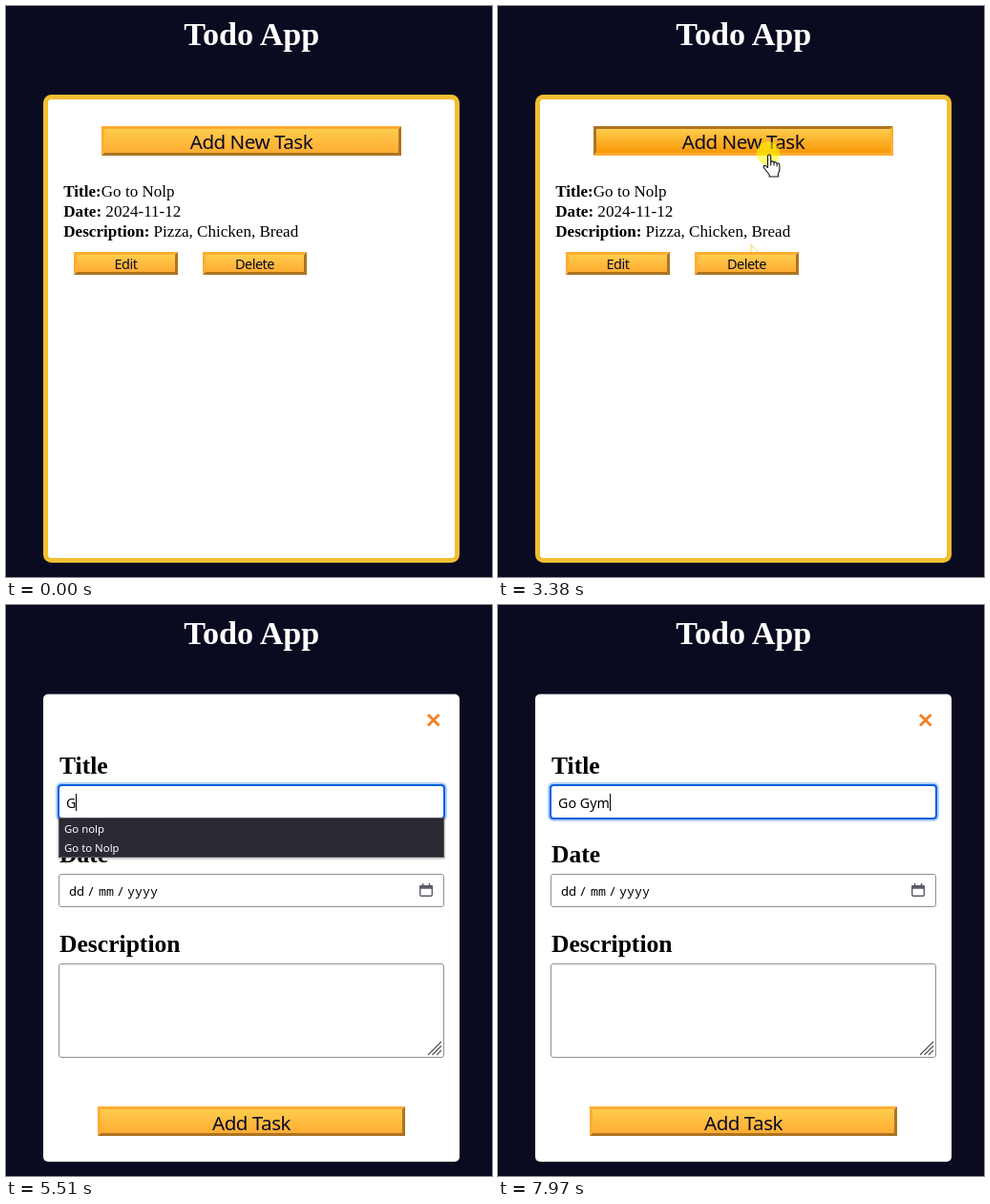
Animation, 509 px wide and 599 px high, one loop 8000 ms. Source, as an HTML page:

```html
<!DOCTYPE html>
<html lang="en">
<head>
<meta charset="utf-8">
<title>Todo App</title>
<style>
  html, body { margin: 0; width: 100%; height: 100%; overflow: hidden; background: #0a0a21; }
  svg { display: block; width: 509px; height: 599px; }
  text { white-space: pre; }
  .serif { font-family: "Liberation Serif", serif; font-size: 17.07px; }
  .h1 { font: bold 34.13px "Liberation Serif", serif; fill: #fff; text-anchor: middle; }
  .label { font: bold 25.6px "Liberation Serif", serif; }
  .big { font: 20.6px "Noto Sans", sans-serif; letter-spacing: -.5px; text-anchor: middle; fill: #0a0a23; }
  .small { font: 14.5px "Noto Sans", sans-serif; letter-spacing: -.5px; text-anchor: middle; fill: #0a0a23; }
  .input { font: 14.3px "Noto Sans", sans-serif; }
  .mono { font: 13.33px "Noto Sans Mono", monospace; }
  .menu { font: 11.4px "Noto Sans", sans-serif; fill: #fbfbfe; }
  .field { fill: #fff; stroke: #8f8f9d; }
</style>
</head>
<body>
<svg id="stage" viewBox="0 0 509 599">
  <defs>
    <linearGradient id="normal" x2="0" y2="1">
      <stop stop-color="#fecc4c"/><stop offset="1" stop-color="#ffac33"/>
    </linearGradient>
    <linearGradient id="hover" x2="0" y2="1">
      <stop stop-color="#ffcc4c"/><stop offset="1" stop-color="#f89808"/>
    </linearGradient>
  </defs>
  <rect width="509" height="599" fill="#0a0a21"/>
  <text class="h1" x="257.3" y="41">Todo App</text>

  <g id="list">
    <rect x="41.5" y="95.5" width="431" height="486" rx="6" fill="#fff" stroke="#f1be32" stroke-width="5"/>
    <g class="serif">
      <text x="60.3" y="200"><tspan font-weight="bold">Title:</tspan>Go to Nolp</text>
      <text x="60.3" y="221"><tspan font-weight="bold">Date:</tspan> 2024-11-12</text>
      <text x="60.3" y="242"><tspan font-weight="bold">Description:</tspan> Pizza, Chicken, Bread</text>
    </g>
    <g id="listButtons"></g>
  </g>

  <g id="form">
    <rect x="39" y="93.5" width="436" height="490.5" rx="5" fill="#fff"/>
    <path d="M442 115l11.5 11.5M453.500 115L442 126.500" stroke="#f28127" stroke-width="3"/>
    <text class="label" x="56" y="177">Title</text>
    <text class="label" x="56" y="270">Date</text>
    <text class="label" x="56" y="364">Description</text>
    <rect class="field" x="55.500" y="189.500" width="403" height="34" rx="2.500"/>
    <g id="ring" fill="none" stroke-width="2">
      <rect x="53" y="187" width="408" height="39" rx="5" stroke="#0060df" stroke-opacity=".3"/>
      <rect x="55" y="189" width="404" height="35" rx="3" stroke="#0060df"/>
    </g>
    <text id="typed" class="input" x="63" y="213"></text>
    <rect id="caret" y="198" width="1" height="18"/>
    <rect class="field" x="55.500" y="282.500" width="403" height="34" rx="2.500"/>
    <g class="mono">
      <text x="66" y="305">dd</text><text x="85" y="305">/</text>
      <text x="97" y="305">mm</text><text x="116" y="305">/</text>
      <text x="127" y="305">yyyy</text>
    </g>
    <g fill="none" stroke="#5b5b66">
      <rect x="433.700" y="294.700" width="12.600" height="10.600" rx="1.500" stroke-width="1.400"/>
      <path d="M433 296h14" stroke-width="3.500"/>
      <path d="M436.500 292v3M443.500 292v3" stroke-width="1.500"/>
    </g>
    <rect class="field" x="55.500" y="376.500" width="403" height="98" rx="2.500"/>
    <path d="M442 472l14-14M446.500 472l9.500-9.500M451 472l5-5" stroke="#55555c" stroke-width="1.200"/>
    <g id="formButton"></g>
  </g>

  <path id="speck" d="M265 258v-8l7 8" fill="none" stroke="#ffc057" opacity=".8"/>
  <g id="menu">
    <rect x="53.500" y="223" width="407" height="44" rx="2" fill="#000" opacity=".15"/>
    <rect x="55.500" y="223.500" width="403" height="41" fill="#2b2a33" stroke="#55545e"/>
    <text class="menu" x="61" y="239">Go nolp</text>
    <text class="menu" x="61" y="259">Go to Nolp</text>
  </g>

  <circle id="press" r="12.300" fill="#ff0" opacity=".55"/>
  <g id="cursor">
    <path id="arrow" d="M.5.5v16l3.700-3.500 2.500 5.800 2.600-1.100-2.500-5.700h5.200z" fill="#fff" stroke="#000"/>
    <g id="beam" fill="none">
      <path d="M-3.500-7.500h3l.5.500.5-.500h3M-3.500 8.500h3l.5-.500.5.500h3M0-7V8" stroke="#222" stroke-width="1.200"/>
    </g>
    <path id="hand" d="M-2.500 12V2Q-2.500.5-1 .5T.7 2V8.500Q1 7.300 2.300 7.400T4 9Q4.400 8 5.700 8.200T7.200 10Q7.800 9.200 8.900 9.600T9.900 11.500V16Q9.900 18 8.400 20.200V23.500H-.8V21.500L-6.300 14.500Q-7.500 12.500-6.300 11.900T-3.800 12.800L-2.500 14ZM.7 8.500V12M4 9V12M7.200 10V13" fill="#fff" stroke="#111" stroke-width="1.100" stroke-linejoin="round"/>
  </g>
</svg>
<script>
const LOOP = 8000, STEP = 66.6;
const $ = id => document.getElementById(id);
const show = (id, on) => $(id).style.display = on ? "" : "none";
const inside = ([x, y, w, h], px, py) => px >= x && px < x + w && py >= y && py < y + h;
const between = (t, a, b) => t >= a && t < b;

const LIGHT = "#feac32", DARK = "#ad7423", BEVEL = 3;

function makeButton(parent, box, label, size, baseline) {
  const [x, y, w, h] = box, b = BEVEL;
  const g = document.createElementNS("http://www.w3.org/2000/svg", "g");
  g.innerHTML =
    `<path d="M${x} ${y + h}V${y}H${x + w}l${-b} ${b}H${x + b}V${y + h - b}z"/>` +
    `<path d="M${x} ${y + h}H${x + w}V${y}l${-b} ${b}V${y + h - b}H${x + b}z"/>` +
    `<rect x="${x + b}" y="${y + b}" width="${w - 2 * b}" height="${h - 2 * b}"/>` +
    `<text class="${size}" x="${x + w / 2}" y="${baseline}">${label}</text>`;
  $(parent).append(g);
  const [top, bottom, face] = g.children;
  const paint = (over, down) => {
    top.setAttribute("fill", down ? DARK : LIGHT);
    bottom.setAttribute("fill", down ? LIGHT : DARK);
    face.setAttribute("fill", over ? "url(#hover)" : "url(#normal)");
  };
  paint(false, false);
  return { box, paint };
}

const buttons = [
  makeButton("listButtons", [100, 126, 314, 31], "Add New Task", "big", 150),
  makeButton("listButtons", [71, 258, 109, 24], "Edit", "small", 276),
  makeButton("listButtons", [206, 258, 109, 24], "Delete", "small", 276)
];
makeButton("formButton", [96, 526, 322, 31], "Add Task", "big", 551);

const lines = [[60, 185, 121, 21], [60, 206, 126, 21], [60, 227, 252, 21]];
const titleBox = [55, 188, 404, 37];

const FORM = 3505, FOCUS = 4290, TYPE = 5445;
// time, x, y of the pointer
const path = [
  [300, 429, 588], [620, 350, 322], [800, 302, 267], [900, 265, 250],
  [1090, 160.5, 203], [1150, 149.5, 198], [1560, 149.5, 198],
  [1900, 190, 213], [2280, 253.5, 234], [2765, 253.5, 234],
  [2950, 266, 195], [3170, 285, 155.5], [3900, 285, 155.5],
  [4240, 258, 197], [4500, 258, 197], [4640, 262, 175]
];
const presses = [[1365, 1565], [2425, 2625], [3375, FORM], [FOCUS, 4500]];
const keys = [
  [TYPE, "G"], [5645, "Go"], [5905, "Go "], [6175, "Go G"], [6905, "Go Gn"],
  [7435, "Go G"], [7835, "Go Gy"], [7960, "Go Gym"]
];
const caretOff = [[4845, TYPE], [6505, 6905]];
const menuOn = [[5445, 7035], [7500, 7960]];

function pointAt(t) {
  const q = 300 + Math.floor((t - 300) / STEP + .1) * STEP;
  const i = path.findIndex(p => p[0] > q);
  if (i < 0) return path[path.length - 1].slice(1);
  if (i === 0) return path[0].slice(1);
  const [a, b] = [path[i - 1], path[i]];
  const k = (q - a[0]) / (b[0] - a[0]);
  return [a[1] + (b[1] - a[1]) * k, a[2] + (b[2] - a[2]) * k];
}

function menuOpacity(t) {
  const span = menuOn.find(([a, b]) => between(t, a, b));
  if (!span) return 0;
  return Math.min(1, .5 + (t - span[0]) / 120, (span[1] - t) / 60);
}

function drawPointer(t) {
  const visible = between(t, 300, TYPE), form = t >= FORM;
  const [x, y] = pointAt(t);
  const pressed = presses.some(([a, b]) => between(t, a, b));
  let kind = "arrow";
  for (const { box, paint } of buttons) {
    const over = visible && !form && inside(box, x, y);
    paint(over, over && pressed);
    if (over) kind = "hand";
  }
  const textBoxes = form ? [titleBox] : lines;
  if (textBoxes.some(b => inside(b, x, y))) kind = "beam";
  if (between(t, FORM, 3900)) kind = "hand";
  for (const id of ["arrow", "beam", "hand"]) show(id, id === kind);
  show("cursor", visible);
  $("cursor").setAttribute("transform", `translate(${x} ${y})`);
  show("press", pressed);
  $("press").setAttribute("cx", x - 2);
  $("press").setAttribute("cy", y - 1);
}

function drawForm(t) {
  show("list", t < FORM);
  show("form", t >= FORM);
  show("ring", t >= FOCUS);
  const key = keys.filter(k => k[0] <= t).pop();
  const text = key ? key[1] : "";
  const typed = $("typed");
  if (typed.textContent !== text) typed.textContent = text;
  const width = text && t >= FORM ? typed.getComputedTextLength() : 0;
  $("caret").setAttribute("x", Math.round(63 + width));
  show("caret", t >= FOCUS && !caretOff.some(([a, b]) => between(t, a, b)));
  $("menu").setAttribute("opacity", menuOpacity(t));
  show("speck", between(t, 960, TYPE));
}

function render(t) {
  drawForm(t);
  drawPointer(t);
}

const start = performance.now();
function tick(now) {
  render(Math.max(0, now - start) % LOOP);
  requestAnimationFrame(tick);
}
render(0);
requestAnimationFrame(tick);
</script>
</body>
</html>
```
